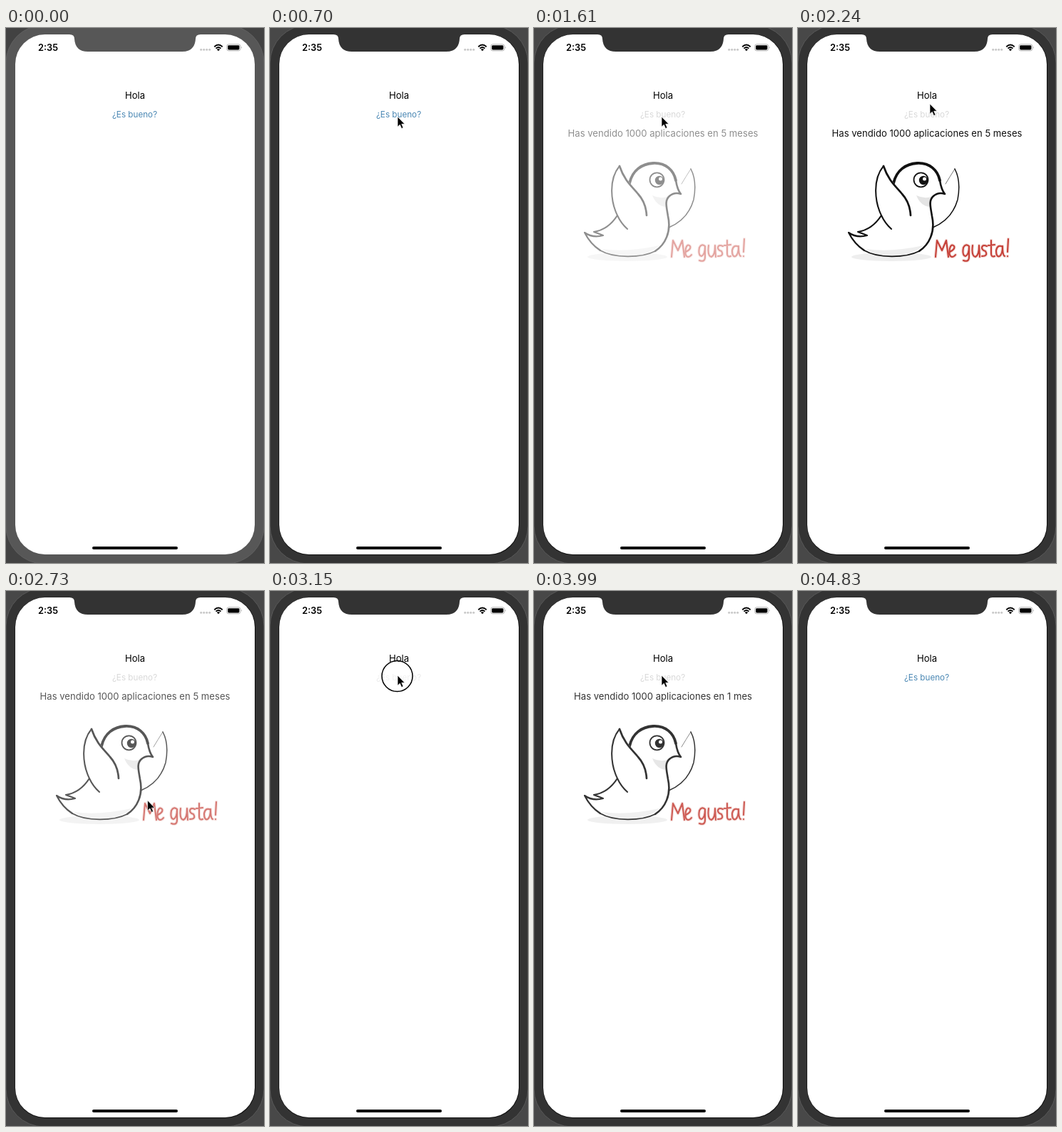
An HTML page for the animation above (5390 ms loop, 362 by 748 pixels).

```html
<!DOCTYPE html>
<html lang="es">
<head>
<meta charset="utf-8">
<style>
  html, body { margin: 0; width: 100%; height: 100%; overflow: hidden; }
  svg { display: block; width: 362px; height: 748px; }
  text { font-family: Inter, Roboto, sans-serif; font-size: 13.1px; }
  .mid { text-anchor: middle; }
  .line { fill: none; stroke-linecap: round; stroke-linejoin: round; }
</style>
</head>
<body>
<svg viewBox="0 0 362 748">
  <rect id="back" width="362" height="748"/>
  <rect id="bezel" x="0" y="-4" width="362" height="753" rx="53"/>
  <rect id="rim" x="12.5" y="8.7" width="337.5" height="728.3" rx="42"/>
  <rect x="13" y="9" width="336" height="727" rx="41.5" fill="#fff"/>
  <path id="notch" d="M89 8V9Q96 9 96 15Q97 33 115 33H247Q265 33 266 15Q266 9 273 9V8Z"/>

  <!-- status bar -->
  <text x="45" y="32" font-weight="600" style="font-size:12.8px">2:35</text>
  <g fill="#c8c8c8">
    <circle cx="273.7" cy="30.3" r="1.5"/><circle cx="277.7" cy="30.3" r="1.5"/>
    <circle cx="281.7" cy="30.3" r="1.5"/><circle cx="285.7" cy="30.3" r="1.5"/>
  </g>
  <g fill="none" stroke="#000" stroke-width="1.9">
    <path d="M292.3 26.2Q298 20.8 303.7 26.2M294.5 28.6Q298 25.4 301.5 28.6"/>
    <path d="M298 32.2L295.9 30Q298 28.2 300.1 30Z" fill="#000" stroke="none"/>
  </g>
  <rect x="309.8" y="22.8" width="19" height="9" rx="2.6" fill="none" stroke="#aaa" stroke-width=".9"/>
  <rect x="311.2" y="24.2" width="16.2" height="6.2" rx="1.4"/>
  <path d="M330 25.6Q331.8 27.3 330 29Z" fill="#aaa"/>
  <rect x="121" y="725" width="120" height="4" rx="2"/>

  <text class="mid" x="181" y="98.5">Hola</text>
  <text class="mid" id="button" x="180.5" y="125" style="font-size:11.7px">¿Es bueno?</text>

  <g id="result">
    <text class="mid" id="message" x="181" y="152" fill="#111"></text>
    <ellipse cx="131" cy="320" rx="56" ry="6" fill="#eee"/>
    <g class="line" stroke="#111" stroke-width="2">
      <!-- far wing -->
      <path d="M207 218Q213 208 220 197" stroke="#777" stroke-width="1"/>
      <path d="M220 197Q229 214 224 240Q216 268 189 279" stroke-width="1.5"/>
      <!-- body and tail -->
      <path d="M134 217C138 199 151 190 167 189C185 188 196 199 199 213Q201 226 206 232Q197 229 190 235C183 241 186 250 188 263C193 285 184 303 170 312C150 322 112 322 93 311Q79 302 71 286Q82 294 97 290Q92 288 84 285Q104 282 117 262Z" fill="#fff" stroke="none"/>
      <path d="M166 234Q178 240 190 235Q184 241 185 250Q172 249 166 234Z" fill="#e4e4e4" stroke="none"/>
      <path d="M96 309Q130 314 176 304Q158 320 128 319Q106 318 96 309Z" fill="#eee" stroke="none"/>
      <path d="M134 217C138 199 151 190 167 189C185 188 196 199 199 213" stroke-width="3.8"/>
      <path d="M199 213Q201 226 206 232Q197 229 190 235C183 241 186 250 188 263C193 285 184 303 170 312" stroke-width="2.6"/>
      <path d="M170 312C150 322 112 322 93 311" stroke-width="1.6"/>
      <path d="M93 311Q79 302 71 286Q82 294 97 290Q92 288 84 285Q104 282 117 262" stroke-width="2.2"/>
      <!-- near wing -->
      <path d="M117 262C108 244 104 212 120 193C128 214 150 229 158 262L131 281Q122 273 117 262Z" fill="#fff" stroke="none"/>
      <path d="M131 281Q122 273 117 262C108 244 104 212 120 193" stroke-width="2"/>
      <path d="M120 193C127 214 138 222 146 232Q157 244 158 262" stroke-width="2.7"/>
      <!-- eye -->
      <circle cx="172.5" cy="212.3" r="10" fill="#fff" stroke-width="1.8"/>
      <circle cx="176" cy="213" r="6.2" fill="#111" stroke="none"/>
      <circle cx="177.5" cy="211" r="2.5" fill="#fff" stroke="none"/>
    </g>
    <g class="line">
      <path id="halo" stroke="#f3dbd8" stroke-width="4.4"/>
      <path id="letters" stroke="#c64038" stroke-width="2.1"
        d="M193 320L195 297L202 311L208 297L211 320M213 313Q221 309 219 305Q215 301 213 308Q211 319 216 320Q219 320 221 317M240 305Q235 301 232 307Q230 318 235 319Q240 317 240 305L240 320Q240 328 232 325M245 304Q243 319 249 320Q254 318 254 304L255 320M265 305Q258 302 258 308Q259 311 263 312Q267 319 258 319M271 297L271 315Q271 321 276 319M267 304L276 303M287 306Q280 302 278 311Q278 321 283 319Q287 316 287 305Q287 318 290 319M295 295L294 313M294 319L294 319.3"/>
    </g>
  </g>

  <circle id="press" r="21.5" fill="#fff" fill-opacity=".3" stroke="#000" stroke-width="1.5"/>
  <path id="cursor" d="M0 0V14.2L3.3 11.2L5.6 16.5L8 15.4L5.7 10.3H10Z" stroke="#fff" stroke-width=".7"/>
</svg>
<script>
const LOOP = 5390, STEP = 70;
const el = id => document.getElementById(id);
const set = (id, attrs) => {
  for (const k in attrs) el(id).setAttribute(k, attrs[k]);
};
const clamp = v => Math.max(0, Math.min(1, v));
const ease = v => v * v * (3 - 2 * v);
const between = (t, a, b) => t >= a && t < b;

// pointer path: time, x, y
const path = [
  [0, 205, 752], [280, 179, 124], [1680, 179, 124], [2170, 184, 112],
  [2240, 185, 106], [2590, 199, 296], [2700, 199, 296], [3080, 179, 118],
  [3990, 179, 118], [4340, 236, 566], [4480, 247, 597], [4690, 247, 597], [4830, 250, 650]
];

function pointer(t) {
  const i = path.findIndex(p => p[0] > t);
  if (i < 0) return path[path.length - 1].slice(1);
  const [a, ax, ay] = path[i - 1], [b, bx, by] = path[i];
  const k = ease((t - a) / (b - a));
  return [ax + (bx - ax) * k, ay + (by - ay) * k];
}

function buttonColor(t, pressed) {
  if (pressed) return '#ececec';
  const disabled = between(t, 1120, 2800) || between(t, 3220, 4760);
  return disabled ? '#d9d9d9' : '#4b88b4';
}

// fades in over a second, out over 200 ms
const shown = (t, start, end) =>
  ease(clamp((t - start) / 1000)) * (1 - clamp((t - end) / 200));

function draw(now) {
  const t = Math.floor(now % LOOP / STEP) * STEP;
  const focused = t >= 490, second = t >= 3150;
  const pressed = between(t, 910, 1120) || between(t, 3080, 3220);
  const [x, y] = pointer(t);

  const frame = focused ? '#333' : '#575757';
  set('back', { fill: focused ? '#484848' : '#424242' });
  set('bezel', { fill: frame, stroke: focused ? '#5a5a5a' : '#606060' });
  set('notch', { fill: frame });
  set('rim', { fill: focused ? '#111' : frame });

  set('button', { fill: buttonColor(t, pressed) });
  el('message').textContent =
    'Has vendido 1000 aplicaciones en ' + (second ? '1 mes' : '5 meses');
  set('result', { opacity: second ? shown(t, 3230, 4630) : shown(t, 1130, 2670) });

  set('cursor', {
    transform: `translate(${x} ${y})`,
    visibility: between(t, 70, 4830) ? 'visible' : 'hidden'
  });
  set('press', { cx: x - .5, cy: y + 1, visibility: pressed ? 'visible' : 'hidden' });
}

set('halo', { d: el('letters').getAttribute('d') });
const start = performance.now();
(function tick() {
  draw(performance.now() - start);
  requestAnimationFrame(tick);
})();
</script>
</body>
</html>
```
